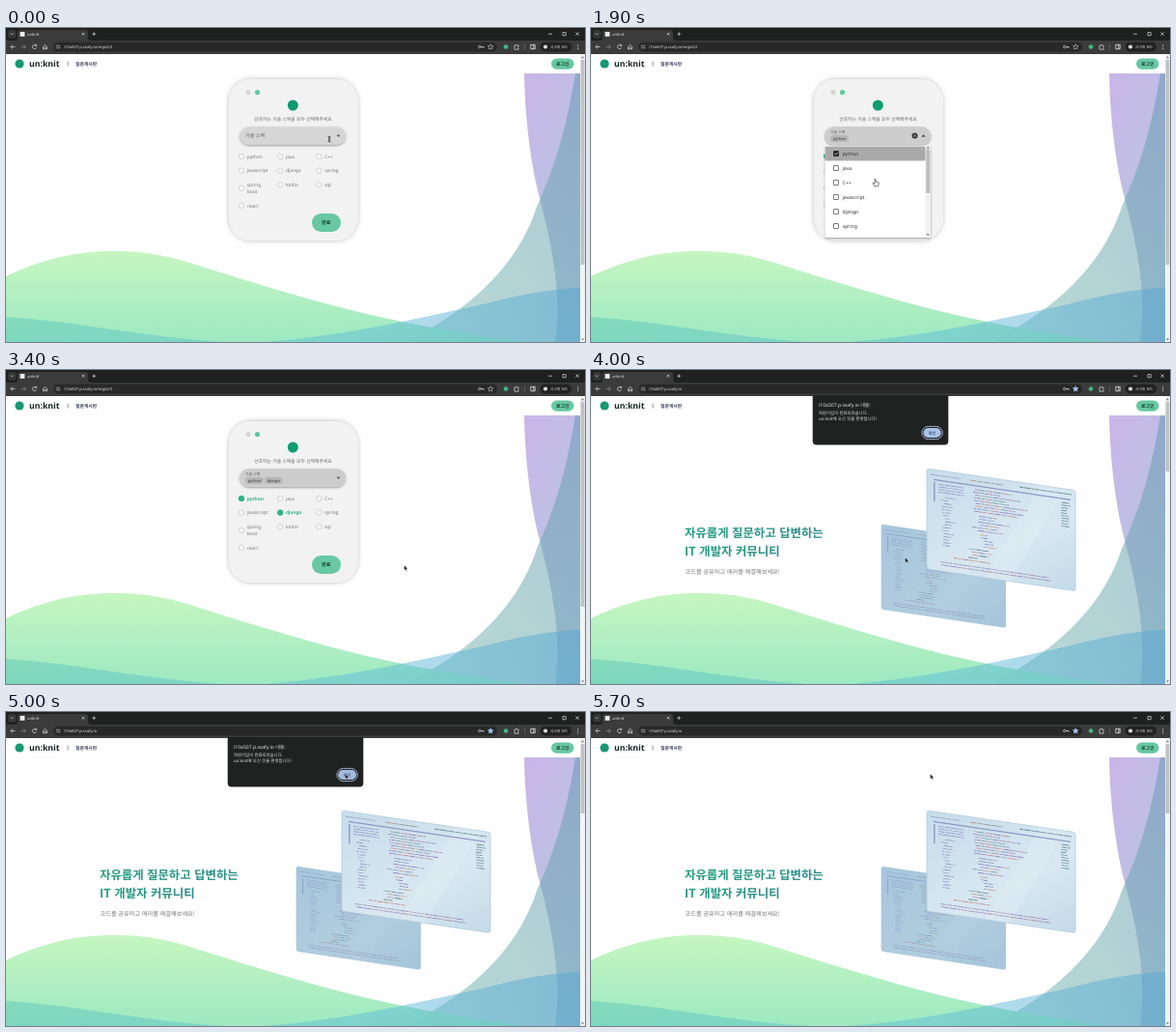
An HTML page for the animation above (5.75 s loop, 600x325 px).

```html
<!DOCTYPE html>
<html lang="ko">
<head>
<meta charset="utf-8">
<title>unknit</title>
<style>
html, body { margin: 0; width: 600px; height: 325px; overflow: hidden; background: #fff; }
svg { display: block; }
text { font-family: "Noto Sans", "Noto Sans CJK KR", "Noto Sans CJK", sans-serif; text-rendering: geometricPrecision; white-space: pre; }
.ko { font-family: "Noto Sans CJK KR", "Noto Sans CJK", "Noto Sans", sans-serif; }
.mid { text-anchor: middle; }
.ui { fill: none; stroke: #d5d5d5; stroke-width: .75; }
.bold { font-weight: 700; }
.pick { fill: #2fb386; }

/* every part runs on the same 5.75 s clock */
.t { animation: 5.75s infinite step-end; }
.fade { animation-timing-function: linear; }
.form { animation-name: form; }
.home { animation-name: home; }
.empty { animation-name: empty; }
.focus { animation-name: focus; }
.menu { animation-name: menu; }
.closed { animation-name: closed; }
.clear { animation-name: clear; }
.py { animation-name: py; }
.dj { animation-name: dj; }
.alert { animation-name: alert; }
.press { animation-name: press; }
.beam { animation-name: beam; }
.hand { animation-name: hand; }
.arrow { animation-name: arrow; }
.path { animation: path 5.75s infinite ease-in-out; }
@keyframes form { 0% { opacity: 1 } 68.7%, 100% { opacity: 0 } }
@keyframes home { 0% { opacity: 0 } 68.7%, 100% { opacity: 1 } }
@keyframes empty { 0% { opacity: 1 } 19.13%, 100% { opacity: 0 } }
@keyframes focus { 0% { opacity: 0 } 19.13%, 100% { opacity: 1 } }
@keyframes menu { 0%, 19.1% { opacity: 0 } 21.7%, 53.9% { opacity: 1 } 55.6%, 100% { opacity: 0 } }
@keyframes closed { 0% { opacity: 1 } 19.13% { opacity: 0 } 53.91%, 100% { opacity: 1 } }
@keyframes clear { 0% { opacity: 0 } 28.7% { opacity: 1 } 53.91%, 100% { opacity: 0 } }
@keyframes py { 0% { opacity: 0 } 28.7%, 100% { opacity: 1 } }
@keyframes dj { 0% { opacity: 0 } 43.48%, 100% { opacity: 1 } }
@keyframes alert { 0% { opacity: 0 } 68.7% { opacity: 1 } 93.91%, 100% { opacity: 0 } }
@keyframes press { 0% { opacity: 0 } 82% { opacity: 1 } 93.91%, 100% { opacity: 0 } }
@keyframes beam { 0% { opacity: 1 } 20%, 100% { opacity: 0 } }
@keyframes hand { 0% { opacity: 0 } 23.5% { opacity: 1 } 48% { opacity: 0 } 62.6% { opacity: 1 } 68.7%, 100% { opacity: 0 } }
@keyframes arrow { 0% { opacity: 0 } 20% { opacity: 1 } 23.5% { opacity: 0 } 48% { opacity: 1 } 62.6% { opacity: 0 } 68.7%, 100% { opacity: 1 } }
@keyframes path {
  0%, 6% { transform: translate(335px, 115px) }
  14.7%, 20% { transform: translate(342px, 115px) }
  26%, 29% { transform: translate(298px, 131px) }
  33%, 34.5% { transform: translate(295px, 160px) }
  40%, 45% { transform: translate(291px, 190px) }
  52%, 59.2% { transform: translate(414px, 205px) }
  64.5%, 73.2% { transform: translate(327px, 197px) }
  82.5%, 100% { transform: translate(353px, 67px) }
}
</style>
</head>
<body>
<svg width="600" height="325" viewBox="0 0 600 325">
<defs>
  <linearGradient id="green" x2="0" y2="1"><stop stop-color="#c1f5bb"/><stop offset="1" stop-color="#95e7bd"/></linearGradient>
  <linearGradient id="purple" x2=".5" y2="1"><stop stop-color="#c9b5e8"/><stop offset="1" stop-color="#b4c9e2"/></linearGradient>
  <linearGradient id="teal" x1="1" y1="0" x2="0" y2="1"><stop stop-color="#6597b0"/><stop offset="1" stop-color="#79bdae"/></linearGradient>
  <linearGradient id="blue" x2="1"><stop stop-color="#5cc6b4"/><stop offset=".6" stop-color="#5cbcd8"/><stop offset="1" stop-color="#52a4d2"/></linearGradient>
  <linearGradient id="glass" x2="1" y2="1"><stop stop-color="#c6dcea"/><stop offset=".6" stop-color="#d8e8f1"/><stop offset="1" stop-color="#c4dae8"/></linearGradient>
  <linearGradient id="title" x2="1"><stop stop-color="#25a07e"/><stop offset="1" stop-color="#2c8c89"/></linearGradient>
  <filter id="soft" x="-20%" y="-20%" width="140%" height="140%"><feDropShadow dx="0" dy="0" stdDeviation="2.8" flood-opacity=".28"/></filter>
  <filter id="drop" x="-20%" y="-20%" width="140%" height="150%"><feDropShadow dx="0" dy="1" stdDeviation="1" flood-opacity=".4"/></filter>
  <g id="panel">
    <rect width="154" height="104" rx="2.5" fill="url(#glass)" stroke="#b4cddd" stroke-width=".8"/>
    <path d="M60 104 L118 0 H144 L86 104Z" fill="#fff" opacity=".13"/>
    <g id="code" opacity=".8"></g>
  </g>
</defs>

<rect width="600" height="325" fill="#fefeff"/>
<!-- waves -->
<path d="M537 47 C538 100 545 146 553 176 C566 225 576 275 569 325 H595 V47Z" fill="url(#purple)"/>
<path d="M590 47 C580 108 568 145 550 185 C534 234 496 284 414 325 H595 V47Z" fill="url(#teal)" opacity=".53"/>
<path d="M0 257 C42 237 78 231 110 231 C150 231 172 237 200 246 C270 268 340 290 415 305 C462 314 500 320 540 325 H0Z" fill="url(#green)" opacity=".92"/>
<path d="M0 299 C80 304 160 324 250 326 C330 323 420 302 485 288 C525 278 560 270 595 269 V325 H0Z" fill="url(#blue)" opacity=".48"/>

<!-- page header -->
<rect y="26" width="595" height="21" fill="#fff"/>
<circle cx="14" cy="37" r="4.6" fill="#159874"/>
<text x="24" y="40" font-size="8.7" class="bold" fill="#182525">un:knit</text>
<path d="M63.6 34.5v5M64.8 34.5v5" stroke="#999" stroke-width=".6"/>
<text x="72" y="39" font-size="4.8" class="ko bold" fill="#333a55">질문게시판</text>
<rect x="565" y="31.5" width="23.5" height="11.2" rx="5.6" fill="#67c8a3"/>
<text x="576.7" y="38.9" font-size="4.9" class="ko mid bold" fill="#163a2e">로그인</text>

<!-- page scrollbar -->
<rect x="595" y="26" width="5" height="299" fill="#f3f3f3"/>
<path d="M595.9 31.2l1.6-2 1.6 2zM595.9 321.5l1.6 2 1.6-2z" fill="#777"/>
<rect class="t form" x="595.6" y="33" width="3.8" height="212" fill="#c1c1c1"/>
<rect class="t home" x="595.6" y="33" width="3.8" height="72" fill="#c1c1c1"/>

<!-- sign-up card -->
<g class="t form">
  <rect x="231" y="53" width="133.5" height="167" rx="23" fill="#f2f2f2" filter="url(#soft)"/>
  <circle cx="251" cy="66.6" r="2.6" fill="#d5d5d5"/>
  <circle cx="260.5" cy="66.6" r="2.6" fill="#5fc99f"/>
  <circle cx="297.3" cy="80" r="5.5" fill="#109b70"/>
  <text x="297.5" y="95.6" font-size="4.8" class="ko mid" fill="#666">선호하는 기술 스택을 모두 선택해주세요</text>
  <g id="radios" font-size="4.8" fill="#777"></g>
  <rect x="317" y="192" width="30" height="19" rx="9.5" fill="#67c8a3"/>
  <text x="331.8" y="203.3" font-size="5.1" class="ko mid bold" fill="#18382d">완료</text>

  <rect x="242.3" y="102.3" width="109.7" height="18.4" rx="9.2" fill="#d6d6d6" filter="url(#drop)"/>
  <rect class="t focus" x="242.3" y="102.3" width="109.7" height="18.4" rx="9.2" fill="#cdcdcd"/>
  <text class="ko t empty" x="248" y="113" font-size="5.1" fill="#5c5c5c">기술 스택</text>
  <text class="ko t focus" x="248" y="108.6" font-size="3.85" fill="#555">기술 스택</text>
  <g font-size="4" fill="#333">
    <g class="t py"><rect x="248" y="110.7" width="19" height="7.4" rx="3.7" fill="#b7b7b7"/><text class="mid" x="257.5" y="115.7">python</text></g>
    <g class="t dj"><rect x="268" y="110.7" width="18.6" height="7.4" rx="3.7" fill="#b7b7b7"/><text class="mid" x="277.3" y="115.7">django</text></g>
  </g>
  <path class="t closed" d="M342.6 110.8h3.8l-1.9 2z" fill="#444"/>
  <path class="t menu fade" d="M342.6 112.5h3.8l-1.9-2z" fill="#222"/>
  <g class="t clear"><circle cx="335.5" cy="111.5" r="3" fill="#333"/><path d="M334.3 110.3l2.4 2.4m0-2.4l-2.4 2.4" stroke="#ddd" stroke-width=".65"/></g>

  <g class="t menu fade">
    <rect x="242.7" y="121.7" width="109.3" height="95" rx=".8" fill="#fff" filter="url(#drop)"/>
    <g id="items" font-size="5.1" fill="#333"></g>
    <rect x="346.6" y="122" width="5.2" height="94.5" fill="#f1f1f1"/>
    <rect x="347.2" y="125.5" width="4" height="45.5" fill="#bdbdbd"/>
    <path d="M347.7 124.4l1.5-1.8 1.5 1.8zM347.7 213.3l1.5 1.8 1.5-1.8z" fill="#666"/>
  </g>
</g>

<!-- landing page -->
<g class="t home">
  <g class="ko bold" font-size="12.4" fill="url(#title)">
    <text class="ko" x="97" y="173">자유롭게 질문하고 답변하는</text>
    <text class="ko" x="97" y="192">IT 개발자 커뮤니티</text>
  </g>
  <text class="ko" x="97.5" y="211" font-size="6.2" fill="#777">코드를 공유하고 에러를 해결해보세요!</text>
  <g transform="matrix(.835 .125 0 .84 301 160)">
    <use href="#panel"/>
    <rect width="154" height="104" rx="2.5" fill="#8ab1cd" opacity=".5"/>
  </g>
  <use href="#panel" transform="matrix(1 .147 0 1 348 102)"/>
</g>

<!-- browser -->
<rect width="600" height="13" fill="#1f2020"/>
<rect y="13" width="600" height="14" fill="#3b3b3b"/>
<path d="M9 13q3 0 3-3V5q0-3 3-3h67q3 0 3 3v5q0 3 3 3z" fill="#3b3b3b"/>
<rect x="2" y="2" width="8.5" height="8.5" rx="2.5" fill="#363737"/>
<rect x="14.6" y="4" width="4.8" height="4.8" fill="#eee"/>
<text x="22" y="7.9" font-size="4.1" fill="#e6e6e6">unknit</text>
<rect x="49" y="14.7" width="460" height="9.8" rx="4.9" fill="#282828"/>
<g class="ui">
  <path d="M4.8 5.5l1.4 1.4 1.4-1.4M78.8 4.9l2.6 2.6m0-2.6l-2.6 2.6M89.4 6.2h3.6m-1.8-1.8v3.6"/>
  <path d="M562 6.2h4M577 4.6h3.2v3.2h-3.2zM590.4 4.4l3.4 3.4m0-3.4l-3.4 3.4"/>
  <path d="M9.5 19.5h-4.6m2.1-2.1l-2.1 2.1 2.1 2.1"/>
  <path d="M15.7 19.5h4.6m-2.1-2.1l2.1 2.1-2.1 2.1" stroke="#888"/>
  <path d="M31.2 18.2a2.1 2.1 0 1 0 .3 2.1M31.6 16.8v1.7h-1.7"/>
  <path d="M38.5 19.3l2-1.9 2 1.9v2.6h-1.3v-1.7h-1.4v1.7h-1.3z"/>
  <circle cx="54" cy="19.5" r="3" fill="#3b3b3b" stroke="none"/>
  <path d="M52.4 18.5h1.5m1 0h.8M52.4 20.5h.6m1 0h1.7"/>
  <circle cx="490.7" cy="19.5" r="1.2"/><path d="M492 19.5h3.1v1.2m-1.2-1.2v1"/>
  <path d="M527 18h1.4q.5-1.7 1.2 0h1.5v1.5q-1.5.7 0 1.4v1.3H527z"/>
  <path d="M537.5 16.5v6" stroke="#666"/>
  <path d="M543.8 17.3h4.4v4.4h-4.4zM546.8 17.3v4.4" stroke-width=".9"/>
</g>
<g stroke-width=".6">
  <path class="t form" d="M502.2 16.7l.8 1.8 2 .2-1.5 1.3.4 2-1.7-1-1.7 1 .4-2-1.5-1.3 2-.2z" fill="none" stroke="#c9c9c9"/>
  <path class="t home" d="M502.2 16.7l.8 1.8 2 .2-1.5 1.3.4 2-1.7-1-1.7 1 .4-2-1.5-1.3 2-.2z" fill="#a8c7fa" stroke="#a8c7fa"/>
</g>
<circle cx="518" cy="19.5" r="2.3" fill="#41b883"/>
<rect x="553.5" y="14.7" width="32.5" height="9.8" rx="4.9" fill="#222"/>
<circle cx="559" cy="19.5" r="2.1" fill="#ddd"/>
<text class="ko" x="564" y="20.9" font-size="3.75" fill="#e6e6e6">시크릿 모드</text>
<g fill="#d5d5d5"><circle cx="592.7" cy="17.6" r=".55"/><circle cx="592.7" cy="19.5" r=".55"/><circle cx="592.7" cy="21.4" r=".55"/></g>
<g font-size="4.1" fill="#e3e3e3">
  <text class="t form" x="60" y="21">i10a507.p.ssafy.io/regist/2</text>
  <text class="t home" x="60" y="21">i10a507.p.ssafy.io</text>
</g>

<!-- alert -->
<g class="t alert">
  <path d="M229.7 26h140.6v47.5q0 4-4 4H233.7q-4 0-4-4z" fill="#202121"/>
  <g fill="#e6e6e6">
    <text x="236" y="38" font-size="5.05">i10a507.p.ssafy.io 내용:</text>
    <text class="ko" x="236" y="46" font-size="4.4">회원가입이 완료되었습니다.</text>
    <text class="ko" x="236" y="52.3" font-size="4.4">un:knit에 오신 것을 환영합니다!</text>
  </g>
  <rect x="342.9" y="58.4" width="21.4" height="13.2" rx="6.6" fill="none" stroke="#a9bfe2" stroke-width=".9"/>
  <rect x="344.4" y="59.9" width="18.4" height="10.2" rx="5.1" fill="#a9c2ea"/>
  <rect class="t press" x="344.4" y="59.9" width="18.4" height="10.2" rx="5.1" fill="#a3b9de"/>
  <text class="ko mid" x="353.6" y="66.6" font-size="4.3" fill="#14305f">확인</text>
</g>

<!-- pointer -->
<g class="path">
  <path class="t beam" d="M-1.5 -2.8q1.5 0 1.5 .7v4.2q0 .7-1.5 .7M1.5 -2.8q-1.5 0-1.5 .7v4.2q0 .7 1.5 .7" fill="none" stroke="#222" stroke-width=".7"/>
  <path class="t hand" d="M-1 -3.6q.7-.5 1.1 .2v2.5l2.6 .6q.7 .3 .6 1.2l-.6 2.9h-3.7l-2.1-3q.2-1 1.1-.4l1 .8z" fill="#fff" stroke="#222" stroke-width=".6"/>
  <path class="t arrow" d="M-1.4 -2.8v5l1.2-1 .9 1.9 .9-.4-.9-1.9h1.6z" fill="#111" stroke="#fff" stroke-width=".3"/>
</g>
</svg>
<script>
const byId = id => document.getElementById(id);

const radio = (x, y, lines, pick = "") => {
  const dy = (lines.length - 1) * 3.6;
  const label = cls => lines.map((s, i) =>
    `<text class="${cls}" x="${x + 5.8}" y="${y + 1.7 + i * 7}">${s}</text>`).join("");
  const base = `<circle cx="${x}" cy="${y + dy}" r="2.8" fill="#f5f5f5" stroke="#bbb" stroke-width=".55"/>${label("")}`;
  return base + (pick && `<g class="t ${pick}"><rect x="${x + 5}" y="${y - 4}" width="20" height="8" fill="#f2f2f2"/>
    <circle class="pick" cx="${x}" cy="${y}" r="3.1"/>${label("pick bold")}</g>`);
};
byId("radios").innerHTML = [
  [244, 133, ["python"], "py"], [284.2, 133, ["java"]], [324.4, 133, ["C++"]],
  [244, 147.6, ["javascript"]], [284.2, 147.6, ["django"], "dj"], [324.4, 147.6, ["spring"]],
  [244, 162.3, ["spring", "boot"]], [284.2, 162.3, ["kotlin"]], [324.4, 162.3, ["sql"]],
  [244, 183.8, ["react"]]
].map(r => radio(...r)).join("");

const picks = { python: "py", django: "dj" };
byId("items").innerHTML = ["python", "java", "C++", "javascript", "django", "spring"].map((name, i) => {
  const y = 130 + i * 15;
  const on = picks[name];
  return (on ? `<rect class="t ${on}" x="242.7" y="${y - 7.4}" width="104" height="14.8" fill="#a9a9a9"/>` : "") +
    `<rect x="251.5" y="${y - 2.5}" width="5" height="5" rx=".5" fill="none" stroke="#444" stroke-width=".7"/>` +
    (on ? `<g class="t ${on}"><rect x="251.2" y="${y - 2.8}" width="5.6" height="5.6" rx=".6" fill="#222"/>
      <path d="M252.4 ${y}l1.2 1.2 2.2-2.4" fill="none" stroke="#fff" stroke-width=".7"/></g>` : "") +
    `<text x="260.5" y="${y + 1.8}">${name}</text>`;
}).join("");

let seed = 7;
const rand = () => (seed = seed * 16807 % 2147483647) / 2147483647;
const dashes = (x, y, width, colors) => {
  let out = "";
  for (const end = x + width; x < end;) {
    const w = Math.min(2 + rand() * 6, end - x);
    out += `<rect x="${x.toFixed(1)}" y="${y.toFixed(1)}" width="${w.toFixed(1)}" height=".9" fill="${colors[Math.floor(rand() * colors.length)]}"/>`;
    x += w + .7;
  }
  return out;
};
// x, y, rows, row step, shortest, longest, indent spread, colours
const violet = ["#8c88c4", "#9a95c8"];
const mixed = ["#8a72b5", "#c99a82", "#8987bd", "#bd7f8c", "#71989c"];
const dark = ["#47727b", "#55808a"];
byId("code").innerHTML = [
  [4, 5, 1, 3, 30, 31, 0, violet],
  [45, 5, 1, 3, 33, 35, 0, ["#a98a7c", "#8f8295"]],
  [96, 4.5, 1, 3, 52, 54, 0, dark],
  [12, 14, 4, 2.7, 25, 30, 0, violet],
  [15, 27, 17, 3.1, 5, 11, 4, violet],
  [48, 14, 9, 2.8, 24, 54, 3, mixed],
  [46, 41, 6, 3, 14, 34, 10, mixed],
  [55, 60, 5, 3, 7, 15, 5, mixed],
  [42, 76, 4, 3, 9, 22, 6, [...mixed, ...dark]],
  [28, 88, 1, 3, 30, 40, 0, ["#c98a72", "#bd6f82"]],
  [12, 94, 2, 3, 100, 124, 3, ["#8a72b5", "#9b8eae", "#ad8290"]],
  [139, 14, 10, 2.7, 5, 9, 1, dark]
].map(([x, y, rows, step, lo, hi, spread, colors]) =>
  Array.from({ length: rows }, (_, i) =>
    dashes(x + rand() * spread, y + i * step, lo + rand() * (hi - lo), colors)).join("")
).join("") + `<rect x="7" y="9.8" width="142" height="1.2" fill="#7e86bd"/>
  <rect x="7" y="13" width="1.6" height="20" fill="#8c91c4"/>`;
</script>
</body>
</html>
```
